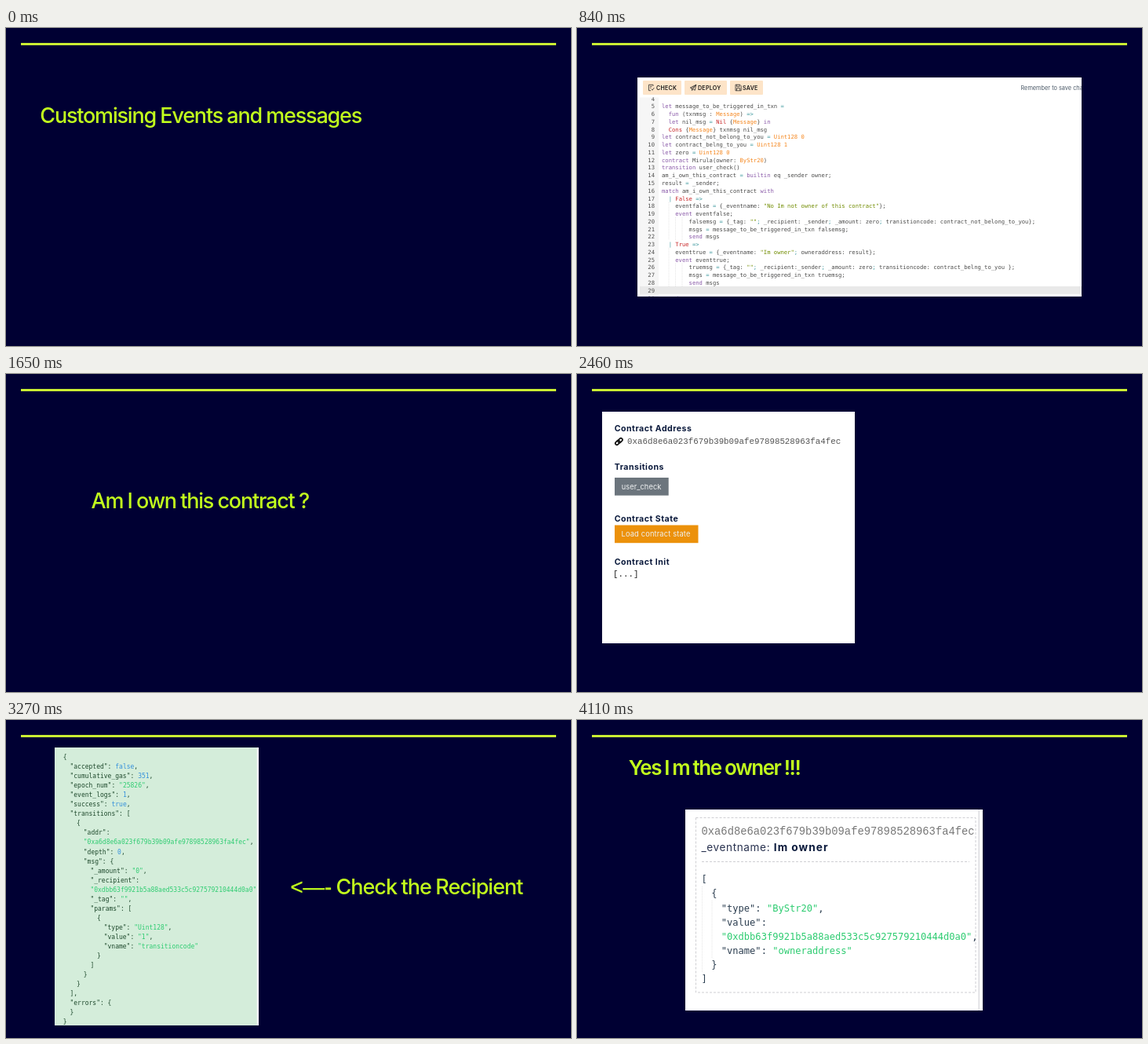
Recreate the animation shown at these times as an HTML page. Size 720 by 405 pixels, loop 4.92 s.

```html
<!DOCTYPE html>
<html lang="en">
<head>
<meta charset="utf-8">
<title>Customising Events and messages</title>
<style>
  html, body { margin: 0; width: 100%; height: 100%; overflow: hidden; background: #000033; }
  svg { display: block; }
  #stage { width: 720px; height: 405px; }
  text { white-space: pre; }
  .title { font: 500 27px Inter, sans-serif; letter-spacing: -1.2px; word-spacing: -.7px; fill: #c2ff1d; }
  .arrow { font: 27.5px "Liberation Sans", Arial, sans-serif; fill: #c2ff1d; stroke: #c2ff1d; stroke-width: .4; }
  .ui { font-family: Inter, "Open Sans", sans-serif; }
  .code { font-family: "DejaVu Sans Mono", monospace; }
  .hex { font-family: "Liberation Mono", monospace; }
  .head { font-weight: 700; font-size: 10.6px; letter-spacing: .48px; fill: #0b1a3c; }
  .btn { font-size: 9.3px; fill: #eef0f1; }
  .tool { font-weight: 600; font-size: 7.1px; letter-spacing: .25px; fill: #1c1c1c; }
  .icon { fill: none; stroke: #2b2b2b; stroke-width: .8; stroke-linejoin: round; }
  .guide { stroke: #d5d5d5; stroke-width: .6; stroke-dasharray: 1 1; }
  .dash { fill: none; stroke: #cfcfd3; stroke-dasharray: 3 2; }
  .scilla { fill: #4d4d4c; font-size: 7.19px; }
  .scilla .kw { fill: #8959a8; }
  .scilla .op { fill: #3e999f; }
  .scilla .type { fill: #f5871f; }
  .scilla .cons { fill: #c82829; }
  .scilla .str { fill: #718c00; }
  .json .str { fill: #2ecc71; }
  .json .num { fill: #3490dc; }
</style>
</head>
<body>
<svg id="stage" viewBox="0 0 720 405">
  <rect width="720" height="405" fill="#000033"/>
  <rect x="19" y="19" width="682" height="3" fill="#caf033"/>
</svg>
<script>
const LOOP = 4920;
const STARTS = [0, 840, 1650, 2460, 3270, 4110];

const SCILLA = /(?<str>"[^"]*")|(?<type>\b(?:Message|Uint128|ByStr20|\d+)\b)|(?<cons>\b(?:Nil|Cons|True|False)\b)|(?<kw>\b(?:let|fun|in|contract|transition|builtin|match|with|event|send|end)\b)|(?<op>=>?|\||;(?= ))/g;
const JSON_RE = /(?<key>"[^"]*":)|(?<str>"[^"]*")|(?<num>\b(?:true|false|\d+)\b)/g;

const CONTRACT = '0xa6d8e6a023f679b39b09afe97898528963fa4fec';
const OWNER = '0xdbb63f9921b5a88aed533c5c927579210444d0a0';

const SOURCE = `
let message_to_be_triggered_in_txn =
  fun (txnmsg : Message) =>
  let nil_msg = Nil {Message} in
  Cons {Message} txnmsg nil_msg
let contract_not_belong_to_you = Uint128 0
let contract_belng_to_you = Uint128 1
let zero = Uint128 0
contract Mirula(owner: ByStr20)
transition user_check()
am_i_own_this_contract = builtin eq _sender owner;
result = _sender;
match am_i_own_this_contract with
  | False =>
    eventfalse = {_eventname: "No Im not owner of this contract"};
    event eventfalse;
        falsemsg = {_tag: ""; _recipient: _sender; _amount: zero; tranistioncode: contract_not_belong_to_you};
        msgs = message_to_be_triggered_in_txn falsemsg;
        send msgs
  | True =>
    eventtrue = {_eventname: "Im owner"; owneraddress: result};
    event eventtrue;
        truemsg = {_tag: ""; _recipient:_sender; _amount: zero; transitioncode: contract_belng_to_you };
        msgs = message_to_be_triggered_in_txn truemsg;
        send msgs

  end`.split('\n');

const RECEIPT = `{
  "accepted": false,
  "cumulative_gas": 351,
  "epoch_num": "25826",
  "event_logs": 1,
  "success": true,
  "transitions": [
    {
      "addr":
      "${CONTRACT}",
      "depth": 0,
      "msg": {
        "_amount": "0",
        "_recipient":
        "${OWNER}",
        "_tag": "",
        "params": [
          {
            "type": "Uint128",
            "value": "1",
            "vname": "transitioncode"
          }
        ]
      }
    }
  ],
  "errors": {
  }
}`.split('\n');

const EVENT = `[
  {
    "type": "ByStr20",
    "value":
    "${OWNER}",
    "vname": "owneraddress"
  }
]`.split('\n');

const rect = (x, y, w, h, fill, extra = '') =>
  `<rect x="${x}" y="${y}" width="${w}" height="${h}" fill="${fill}" ${extra}/>`;
const text = (x, y, str, cls, style = '') =>
  `<text x="${x}" y="${y}" class="${cls}" style="${style}">${str}</text>`;
const vline = (x, y1, y2) => `<path class="guide" d="M${x} ${y1}V${y2}"/>`;

const colour = (line, re) => line.replace(re, (m, ...rest) => {
  const [name] = Object.entries(rest.at(-1)).find(([, v]) => v !== undefined);
  return `<tspan class="${name}">${m}</tspan>`;
});

// Lays out lines; leading spaces become an x offset of `indent` each.
const block = (lines, x, y, pitch, indent, re, cls, style) => lines.map((line, i) => {
  const body = line.trimStart();
  const left = x + (line.length - body.length) * indent;
  return text(left.toFixed(2), (y + i * pitch).toFixed(2), colour(body, re), 'code ' + cls, style);
}).join('');

function editor() {
  const pitch = 9.77, base = 92.5;
  const numbers = SOURCE.map((_, i) =>
    text(99, (base + i * pitch).toFixed(2), i + 4, 'code scilla', 'text-anchor:end')).join('');
  const tools = [[84, 49, 101, 'CHECK'], [137, 54, 154, 'DEPLOY'], [195, 42, 211, 'SAVE']]
    .map(([x, w, tx, label]) => rect(x, 67, w, 18, '#fde4c8', 'rx="1"') + text(tx, 78.5, label, 'ui tool'))
    .join('');
  const icons = `<g class="icon">
    <path d="M97 74V72.3H91.5V79.7H94M93 74.3H95.5M93 76.2H94.5M94.8 77.8L96 79.2L98.4 76"/>
    <path d="M144.3 76L151.8 72.3L150.3 79.3L147.6 77.6L146.6 79.6L146.2 76.9ZM146.2 76.9L151.8 72.3L147.6 77.6"/>
    <path d="M202 72.2H207.6L209.2 73.8V79.8H202ZM203.7 72.2V74.8H207V72.2M203.5 79.8V76.8H207.7V79.8"/></g>`;
  const guides = vline(117, 222, 270) + vline(117, 280, 329)
    + [[241, 270], [300, 329]].map(([a, b]) => vline(125.5, a, b) + vline(134, a, b)).join('');
  return rect(77, 63, 566, 279, '#fff')
    + `<g clip-path="url(#codeBox)">${rect(80, 88, 24, 254, '#f6f6f6')}${rect(80, 329, 563, 9.8, '#e9e9e9')}
       ${guides}${numbers}${block(SOURCE, 108, base, pitch, 4.328, SCILLA, 'scilla', '')}</g>`
    + tools + icons
    + `<g clip-path="url(#editBox)">${text(565.5, 78.5, 'Remember to save changes', 'ui', 'font-size:7.35px;fill:#4c5a68')}</g>`;
}

function contractPanel() {
  const heads = [[73, 'Contract Address'], [122, 'Transitions'], [187.7, 'Contract State'], [243, 'Contract Init']]
    .map(([y, s]) => text(47.7, y, s, 'ui head')).join('');
  const link = `<g fill="none" stroke="#111" stroke-width="1.7" transform="translate(53.4 86) rotate(-45)">
    <rect x="-5.4" y="-2.2" width="6.4" height="4" rx="2"/><rect x="-1" y="-1.8" width="6.4" height="4" rx="2"/></g>`;
  return rect(32, 48, 322, 295, '#fff') + heads + link
    + text(64, 89, CONTRACT, 'hex', 'font-size:10.81px;fill:#555')
    + rect(48, 132, 68.7, 22.7, '#6c757d') + text(56.7, 146.7, 'user_check', 'ui btn', 'letter-spacing:.05px')
    + rect(48, 192.5, 106.5, 22.7, '#ec910b') + text(56.5, 207.2, 'Load contract state', 'ui btn', 'letter-spacing:.15px')
    + text(46, 258, '[...]', 'hex', 'font-size:10.8px;fill:#222');
}

const receiptPanel = () => rect(62, 35, 260, 354, '#fff') + rect(62, 35, 257.7, 354, '#d4edda')
  + `<g clip-path="url(#receiptBox)">${block(RECEIPT, 72.8, 50, 12.05, 4.325, JSON_RE, 'json', 'font-size:8px;fill:#1f4a2d')}</g>`;

const eventPanel = () => rect(138, 114, 379, 256, '#fff')
  + rect(511.5, 114, 1.5, 256, '#dcdce0')
  + `<rect class="dash" x="151.5" y="124.5" width="356.5" height="222.5"/>`
  + `<path class="dash" d="M159 180.5H500"/>`
  + text(158.5, 146, CONTRACT, 'hex', 'font-size:13.82px;fill:#777')
  + text(158.5, 167, '_eventname:', 'ui', 'font-size:13.6px;letter-spacing:.6px;fill:#2a3350')
  + text(250.8, 167, 'Im owner', 'ui', 'font-size:13.7px;font-weight:700;letter-spacing:1px;fill:#0b1a3c')
  + vline(159.5, 212, 321) + vline(172, 230, 303)
  + block(EVENT, 158.6, 207.3, 18.15, 6.3, JSON_RE, 'json', 'font-size:12.07px;fill:#2c3e50');

const SCENES = [
  text(43.3, 121, 'Customising Events and messages', 'title'),
  editor(),
  text(108.5, 171, 'Am I own this contract ?', 'title'),
  contractPanel(),
  receiptPanel() + text(362.5, 222, '&lt;—-', 'arrow') + text(420.4, 222, 'Check the Recipient', 'title', 'letter-spacing:-1px'),
  text(65.8, 70, 'Yes I m the owner !!!', 'title', 'font-size:26px;font-weight:600;letter-spacing:-1.5px') + eventPanel(),
];

const clip = (id, x, y, w, h) => `<clipPath id="${id}">${rect(x, y, w, h, '#000')}</clipPath>`;
const stage = document.getElementById('stage');
stage.innerHTML += `<defs>${clip('codeBox', 77, 88.5, 566, 253.5)}${clip('editBox', 77, 63, 566, 279)}${clip('receiptBox', 62, 35, 257.7, 354)}</defs>`
  + SCENES.map((s, i) => `<g class="scene" opacity="${i ? 0 : 1}">${s}</g>`).join('');

// Each scene is shown in its own slot, with hard cuts between them.
stage.querySelectorAll('.scene').forEach((scene, i) => {
  const steps = STARTS.map((t, j) => ({ offset: t / LOOP, opacity: +(i === j), easing: 'step-end' }));
  steps.push({ offset: 1, opacity: +(i === STARTS.length - 1) });
  scene.animate(steps, { duration: LOOP, iterations: Infinity });
});
</script>
</body>
</html>
```
